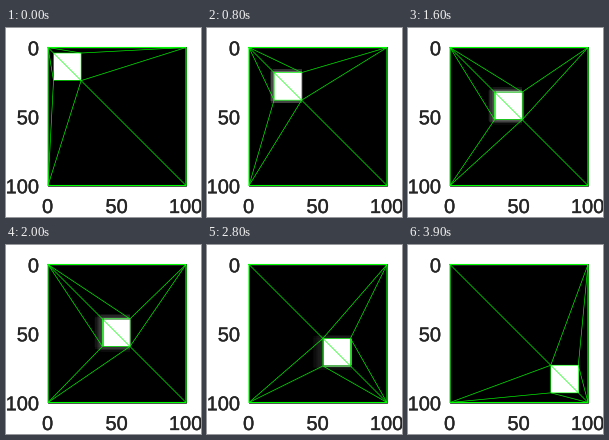
Recreate the animation shown at these times as a matplotlib script. Size 195 px wide and 189 px high, loop 4000 ms.

```python
import numpy as np
import matplotlib.pyplot as plt
from matplotlib.animation import FuncAnimation
from matplotlib.collections import LineCollection
from matplotlib.patches import Rectangle
from matplotlib.patheffects import withStroke

W, H, DPI = 195, 189, 72
FRAMES, INTERVAL = 40, 100
LEFT, TOP, SCALE = 41.5, 19.5, 1.38
SIDE = 20
GREEN = "#00ff00"
INK = "#262626"

plt.rcParams["font.family"] = "Liberation Sans"
plt.rcParams["text.hinting"] = "none"
fig = plt.figure(figsize=(W / DPI, H / DPI), dpi=DPI, facecolor="white")
ax = fig.add_axes([0, 0, 1, 1])
ax.axis("off")


def to_px(points):
    return np.asarray(points, float) * SCALE + (LEFT + 0.5, TOP)


def square_at(i):
    """Near corner of the moving square, equal in x and y."""
    return 4 + 69 * i / (FRAMES - 1)


TL, TR, BR, BL = (0, 0), (100, 0), (100, 100), (0, 100)


def mesh(a):
    """Inner Delaunay edges of the stage corners and the square's corners."""
    b = a + SIDE
    stl, str_, sbr, sbl = (a, a), (b, a), (b, b), (a, b)
    edges = [(stl, str_), (str_, sbr), (sbr, sbl), (sbl, stl), (stl, sbr),
             (TL, stl), (TR, str_), (BR, sbr), (BL, sbl)]
    # the flanking diagonals flip once the square passes the centre
    if a < 50 - SIDE / 2:
        edges += [(TL, str_), (TL, sbl), (TR, sbr), (BL, sbr)]
    else:
        edges += [(TR, stl), (BL, stl), (BR, str_), (BR, sbl)]
    return [to_px(e) for e in edges]


grid = np.arange(100) + 0.5
gx, gy = np.meshgrid(grid, grid)


def picture(i):
    """White square with the soft trail left by the cross-fade."""
    t = i / (FRAMES - 1)
    a = square_at(i)
    b = a + SIDE
    dx = np.maximum(a - gx, 0) / (1 + 10 * t)
    dy = np.maximum(np.maximum(a - gy, gy - b), 0) / (0.5 + 3 * np.sin(np.pi * t))
    fade = np.clip(1 - np.hypot(dx, dy), 0, 1) ** 0.8
    strength = 0.7 * (1 - t) ** 1.2 * min(1, 8 * t)
    trail = strength * fade * (gx < b)
    cover = (np.clip(np.minimum(gx - a, b - gx) + 0.5, 0, 1)
             * np.clip(np.minimum(gy - a, b - gy) + 0.5, 0, 1))
    return np.maximum(trail, cover)


extent = (LEFT, LEFT + 139, TOP + 138.5, TOP - 0.5)
image = ax.imshow(picture(0), cmap="gray", vmin=0, vmax=1, extent=extent,
                  interpolation="nearest", aspect="auto")
ax.add_patch(Rectangle((LEFT, TOP), 138.5, 138, fill=False,
                       edgecolor=INK, linewidth=0.8))
hull = to_px([TL, TR, BR, BL, TL])
ax.plot(*hull.T, color=GREEN, linewidth=1.1, snap=False, zorder=3)
lines = LineCollection(mesh(square_at(0)), colors=GREEN, linewidths=0.65,
                       zorder=3)
lines.set_snap(False)
ax.add_collection(lines)

bolder = [withStroke(linewidth=0.35, foreground=INK)]
for value in (0, 50, 100):
    x, y = to_px((value, value))
    ax.text(x - 0.4, 185, str(value), size=20, color=INK,
            ha="center", va="baseline", path_effects=bolder)
    ax.text(33, y + 7.8, str(value), size=20, color=INK,
            ha="right", va="baseline", path_effects=bolder)

ax.set_xlim(0, W)
ax.set_ylim(H, 0)


def draw(i):
    image.set_data(picture(i))
    lines.set_segments(mesh(square_at(i)))
    return image, lines


anim = FuncAnimation(fig, draw, frames=FRAMES, interval=INTERVAL,
                     repeat=True, repeat_delay=0, blit=False)
plt.show()
```
